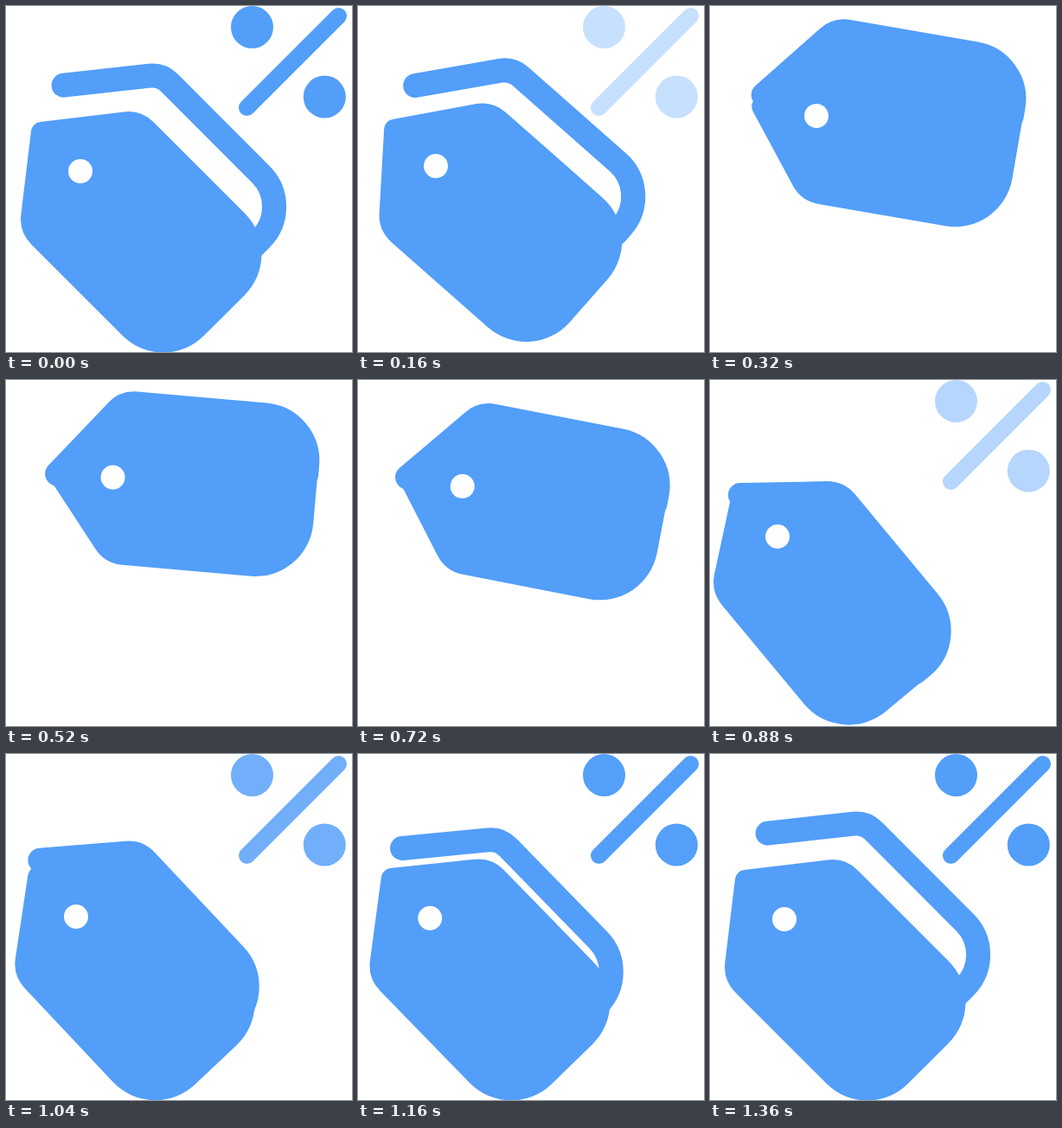
Recreate the animation shown at these times as an HTML page with a canvas. Size 400x400 px, loop 2040 ms.

```html
<!DOCTYPE html>
<html lang="en">
<head>
<meta charset="utf-8">
<title>Price tag</title>
<style>
  html, body { margin: 0; width: 100%; height: 100%; overflow: hidden; background: #fff; }
  canvas { display: block; width: 400px; height: 400px; }
</style>
</head>
<body>
<canvas id="stage" width="400" height="400"></canvas>
<script>
const ctx = document.getElementById('stage').getContext('2d');
const BLUE = '#529ef9';
const LOOP = 2040;
const STEP = 40;
const PIVOT = { x: 18, y: 92 };
const RAD = Math.PI / 180;

// Smooth track through [time, value] keys without overshoot (monotone cubic).
function track(...keys) {
  const slope = i => (keys[i + 1][1] - keys[i][1]) / (keys[i + 1][0] - keys[i][0]);
  const tangents = keys.map((key, i) => {
    if (i === 0 || i === keys.length - 1) return 0;
    const a = slope(i - 1), b = slope(i);
    return a * b > 0 ? 2 * a * b / (a + b) : 0;
  });
  return time => {
    const last = keys.length - 1;
    if (time >= keys[last][0]) return keys[last][1];
    let i = 0;
    while (time >= keys[i + 1][0]) i++;
    const [t0, v0] = keys[i], [t1, v1] = keys[i + 1];
    const span = t1 - t0, p = (time - t0) / span, q = 1 - p;
    return v0 * (1 + 2 * p) * q * q + v1 * p * p * (3 - 2 * p)
      + span * p * q * (q * tangents[i] - p * tangents[i + 1]);
  };
}

const angle = track([0, 45], [160, 41.4], [320, 9.8], [520, 5], [720, 11],
  [880, 50.3], [1040, 46.7], [1360, 45]);
// Hole centre before the swing around the pivot.
const holeX = track([0, 86], [160, 84], [320, 83.6], [520, 85.7], [880, 86], [1040, 83.8], [1360, 86]);
const holeY = track([0, 191], [160, 189.3], [320, 181.1], [520, 175.5], [720, 175],
  [880, 175], [1040, 186.1], [1360, 191]);
// Offset of the rear tag along and across the front tag.
const rearU = track([0, -19.5], [160, -14.8], [320, 0], [880, 0], [1040, -11.5], [1360, -19.5]);
const rearV = track([0, -59], [160, -56.5], [320, -16], [520, -1], [720, -0.5],
  [880, 0], [1040, -17], [1360, -59]);
const percentAlpha = track([0, 1], [160, 0.32], [240, 0], [720, 0], [880, 0.42], [1040, 0.82], [1200, 1]);

function disc(x, y, r, color) {
  ctx.fillStyle = color;
  ctx.beginPath();
  ctx.arc(x, y, r, 0, 2 * Math.PI);
  ctx.fill();
}

function strokeRound(width) {
  ctx.strokeStyle = BLUE;
  ctx.lineWidth = width;
  ctx.lineCap = 'round';
  ctx.stroke();
}

function drawPercent(alpha) {
  ctx.globalAlpha = alpha;
  disc(284.5, 24.5, 24.5, BLUE);
  disc(368.3, 105, 24.5, BLUE);
  ctx.beginPath();
  ctx.moveTo(278.5, 117.5);
  ctx.lineTo(384.5, 11.5);
  strokeRound(19);
  ctx.globalAlpha = 1;
}

function drawRearTag(u, v) {
  ctx.save();
  ctx.translate(u, v);
  ctx.beginPath();
  ctx.moveTo(-64.5, 2.5);
  ctx.arcTo(6.4, -86, 222.5, -86, 28);
  ctx.arcTo(222.5, -86, 222.5, -22, 53);
  ctx.lineTo(222.5, -22);
  strokeRound(28);
  ctx.restore();
}

function drawFrontTag() {
  ctx.fillStyle = BLUE;
  ctx.beginPath();
  ctx.moveTo(100, -100);
  ctx.arcTo(235.5, -100, 235.5, 0, 67);
  ctx.arcTo(235.5, 100, 100, 100, 67);
  ctx.arcTo(-0.5, 100, -79, 0, 42);
  ctx.arcTo(-79, 0, -0.5, -100, 12);
  ctx.arcTo(-0.5, -100, 100, -100, 42);
  ctx.closePath();
  ctx.fill();
  disc(0, 0, 14, '#fff');
}

function draw(time) {
  ctx.fillStyle = '#fff';
  ctx.fillRect(0, 0, 400, 400);
  drawPercent(percentAlpha(time));

  const turn = angle(time) * RAD;
  ctx.save();
  ctx.translate(PIVOT.x, PIVOT.y);
  ctx.rotate(turn - 45 * RAD);
  ctx.translate(holeX(time) - PIVOT.x, holeY(time) - PIVOT.y);
  ctx.rotate(45 * RAD);
  drawRearTag(rearU(time), rearV(time));
  drawFrontTag();
  ctx.restore();
}

const start = performance.now();
function tick() {
  const time = (performance.now() - start) % LOOP;
  draw(Math.floor(time / STEP) * STEP);
  requestAnimationFrame(tick);
}
tick();
</script>
</body>
</html>
```
